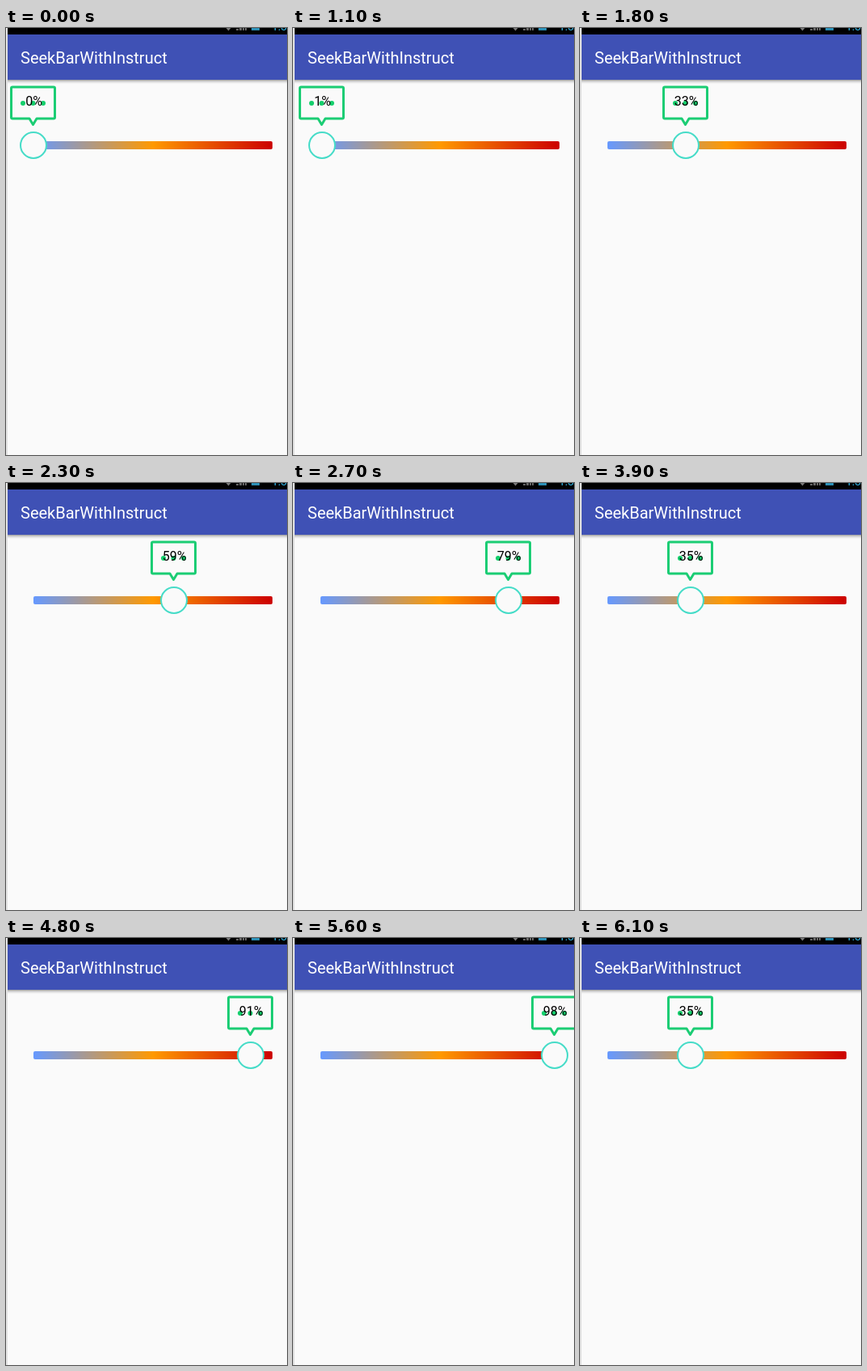
These frames come from a looping animation (348 by 528 pixels, 7300 ms). An HTML page:

```html
<!DOCTYPE html>
<html lang="en">
<head>
<meta charset="utf-8">
<title>SeekBarWithInstruct</title>
<style>
html, body { margin: 0; width: 100%; height: 100%; overflow: hidden; background: #fafafa; }
svg { display: block; width: 348px; height: 528px; }
text { font-family: Roboto, sans-serif; }
</style>
</head>
<body>
<svg viewBox="0 0 348 528" xmlns="http://www.w3.org/2000/svg">
  <defs>
    <linearGradient id="heat">
      <stop offset="0" stop-color="#6699ff"/>
      <stop offset=".5" stop-color="#ff9900"/>
      <stop offset="1" stop-color="#cc0000"/>
    </linearGradient>
    <linearGradient id="shade" x2="0" y2="1">
      <stop offset="0" stop-color="#000" stop-opacity=".36"/>
      <stop offset=".5" stop-color="#000" stop-opacity=".12"/>
      <stop offset="1" stop-color="#000" stop-opacity="0"/>
    </linearGradient>
  </defs>
  <rect width="348" height="528" fill="#fafafa"/>

  <!-- status bar, cut off by the top edge -->
  <rect x="2" width="346" height="8" fill="#000"/>
  <path d="M272.5 0h6l-3 3.5z" fill="#777"/>
  <path d="M285 1h3v2h-3zM289 0h3v3h-3zM293 0h2v3h-2zM296 0h2v3h-2z" fill="#666"/>
  <rect x="304" width="10" height="3" fill="#2b8fb5"/>
  <text x="329" y="3" font-size="14" fill="#33b5e5">1:38</text>

  <!-- app bar -->
  <rect x="2" y="8" width="346" height="56" fill="#3f51b5"/>
  <rect x="2" y="64" width="346" height="5" fill="url(#shade)"/>
  <text x="18" y="44" font-size="20" fill="#fff">SeekBarWithInstruct</text>
  <rect width="2" height="528" fill="#e2e2e2"/>

  <rect x="34" y="140" width="296" height="10" rx="2" fill="url(#heat)"/>
  <g id="slider">
    <circle cy="145" r="16" fill="#fafafa" stroke="#46dcc8" stroke-width="2"/>
    <path d="M-26 73H25Q26.5 73 26.5 74.5V110.5Q26.5 112 25 112H4L-.5 119.5L-5 112H-26Q-27.5 112-27.5 110.5V74.5Q-27.5 73-26 73Z"
      fill="#fafafa" stroke="#1bcd74" stroke-width="3" stroke-linejoin="round"/>
    <g fill="#14cf6c">
      <circle cx="-13" cy="93" r="3"/>
      <circle cx="-.5" cy="93" r="3"/>
      <circle cx="12" cy="93" r="3"/>
    </g>
    <text id="label" x=".5" y="96" font-size="16" text-anchor="middle" fill="#000">0%</text>
  </g>
</svg>
<script>
const LOOP = 7300, STEP = 100;
const slider = document.getElementById('slider');
const label = document.getElementById('label');

// Each drag: start time and the percentage at every step; the last one holds.
const drags = [
  [0, [0]],
  [1100, [1, 4, 8, 13, 18, 23, 28, 33, 38, 43, 48, 53, 59, 64, 69, 74, 79]],
  [3100, [80, 71, 58, 45, 36]],
  [3900, [35, 45, 58, 71, 83]],
  [4600, [84, 88, 91]],
  [5200, [93, 97, 100]],
  [5600, [98, 86, 72, 57, 44, 35]]
];

function percentAt(t) {
  const [start, values] = drags.filter(d => d[0] <= t).pop();
  const i = Math.floor((t - start) / STEP);
  return values[Math.min(i, values.length - 1)];
}

function draw(t) {
  const p = percentAt(t);
  const x = Math.floor(34 + 2.96 * p);
  slider.setAttribute('transform', `translate(${x} 0)`);
  label.textContent = p + '%';
}

const begin = performance.now();
function tick() {
  draw((performance.now() - begin) % LOOP);
  requestAnimationFrame(tick);
}
tick();
</script>
</body>
</html>
```
